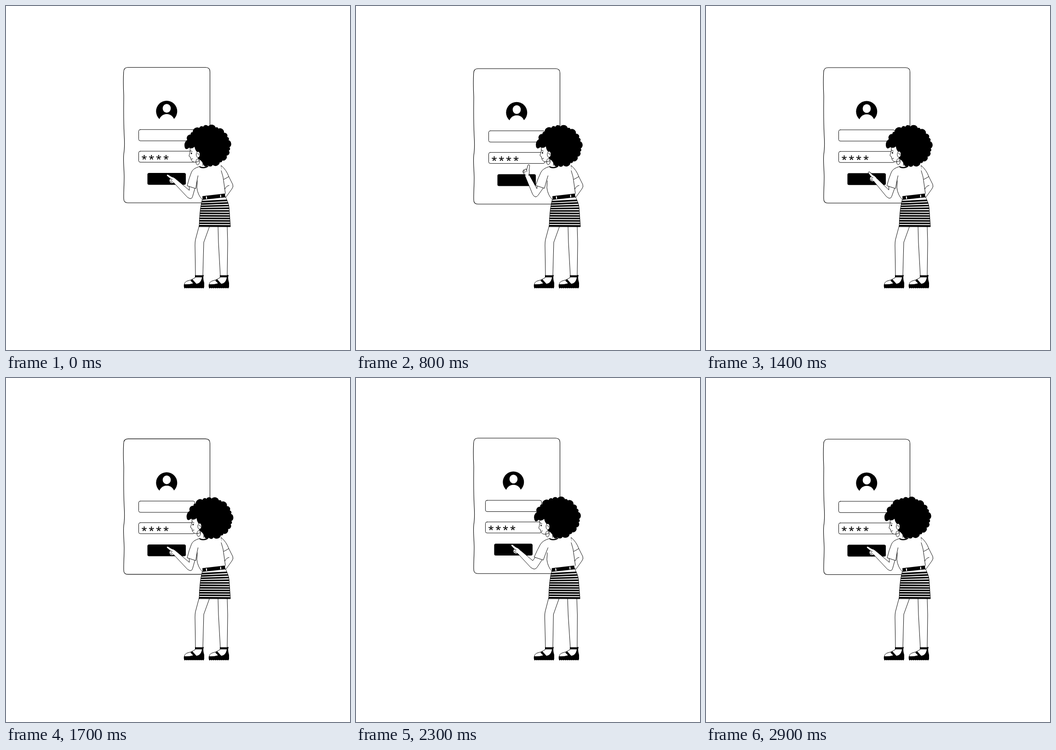
An HTML page that plays this animation: 748x748 px, repeating every 3 s.

```html
<!DOCTYPE html>
<html lang="en">
<head>
<meta charset="utf-8">
<title>Login</title>
<style>
  html, body { margin: 0; width: 100%; height: 100%; overflow: hidden; background: #fff; }
  svg { display: block; width: 100%; height: 100%; }
  .ln { fill: #fff; stroke: #000; stroke-width: .95; stroke-linejoin: round; stroke-linecap: round; }
  .open { fill: none; }
  .w { fill: #fff; }
  text { font: 22px "Open Sans", "Noto Sans", sans-serif; text-anchor: middle; stroke: #000; stroke-width: .2; }
</style>
</head>
<body>
<svg viewBox="0 0 748 748">
  <defs>
    <path id="skirtShape" d="M427 420L477 415Q484 428 485 438L488 480H420Q421 440 427 420Z"/>
    <clipPath id="skirtClip"><use href="#skirtShape"/></clipPath>
    <g id="shoe">
      <path class="ln" d="M412 586L411 591Q403 596 394 598Q388 600 388 606H430L427 586Z"/>
      <path d="M411 585H430L429 590Q429 596 431 602V611L430 613H388Q386 610 387 605Q397 606 407 603L401 597L405 594L414 604Q424 603 426 590H411Z"/>
      <path d="M389 612.4H430" stroke="#000" stroke-width="3" stroke-linecap="round" stroke-dasharray="0 4.4"/>
    </g>
  </defs>

  <g id="panel">
    <path class="ln" style="stroke-width:1.1" d="M265 133.5H434Q443.500 133.500 443.500 143V428H265Q256 428 256 419C255.500 405 257 390 257 370C256.500 350 254.500 335 256 322C258.500 308 258 296 257 280C255 240 256 215 256 195C255 175 255 160 255.700 144Q256 133.500 265 133.500Z"/>
    <g id="form">
      <circle cx="349.300" cy="229" r="23"/>
      <ellipse class="w" cx="349.500" cy="222.500" rx="8.800" ry="9.500"/>
      <circle class="w" cx="349.500" cy="252" r="17"/>
      <rect class="ln" x="288.500" y="268.700" width="122" height="24.500" rx="3.500"/>
      <rect class="ln" x="288.500" y="315.700" width="122" height="24" rx="3.500"/>
      <text x="300.500 316.300 332 348" y="340">****</text>
      <rect x="307.500" y="363" width="83.500" height="25.700" rx="3.500"/>
    </g>
  </g>

  <use href="#shoe"/>
  <use href="#shoe" x="54"/>
  <g id="lower">
    <path class="ln" d="M420 478L412 508Q411 512 411 520L412 586H428L430 514L443 478ZM461 478L462 515L466 586H481L482 515L481 478Z"/>
    <use href="#skirtShape" class="ln"/>
    <g id="stripes" clip-path="url(#skirtClip)" stroke="#000" stroke-width="3.400"/>
  </g>

  <path class="ln" d="M468 347Q479 356 484.500 371L493 388Q495 393 491 398L478 416L470 408Z"/>
  <path class="ln open" d="M484.500 371L472 378M485 390Q478 392 476 398"/>
  <path class="w" d="M421 348L415 395Q418 412 425 420L477 413L474 380L467 347Z"/>
  <path class="ln open" d="M416 380L415 395Q417 411 426 420M468 358Q473 372 474 386L477 408"/>
  <g id="belt">
    <path d="M427 413.500L476 407.800L477 416L427.500 421.500Z"/>
    <path d="M435.700 414L436.200 419.500M466.500 410.500L467 416" stroke="#fff" stroke-width="2.200"/>
  </g>

  <path id="arm" class="ln"/>
  <g id="hand">
    <path class="ln" d="M-4.500 1C-9 -1 -11 -4 -9 -8L-5 -11L-3 -10L-3 -20Q-1.500 -23.500 .8 -20.500L2.500 -10Q5 -7 4.500 1"/>
    <path class="ln open" d="M-9 -7L-4 -5.500M-9.500 -4L-4.500 -2.500M-3 -10L-1.500 -6"/>
  </g>
  <path id="sleeve" class="ln"/>
  <path d="M420.500 348Q430 353 440 347L440 349Q431 355.500 421 351Z"/>

  <g id="head">
    <path class="w" d="M413 335H430V348H421Z"/>
    <path class="ln" d="M400 306L400.500 316Q399 322 398 326Q399 328.500 401 328.500L402.500 334Q405 340 412 339.500Q421 339 424 330V306Z"/>
    <path class="ln open" d="M428 336V347M400.500 314.500L405 316.500M403.500 333L406 332"/>
    <ellipse cx="403.200" cy="320.300" rx="1.300" ry="1.900"/>
    <path id="hair"/>
    <ellipse class="ln" cx="417.700" cy="323" rx="4" ry="6.500"/>
    <path class="ln open" d="M416 321Q419 319 419 324"/>
    <ellipse class="ln open" cx="416.700" cy="339" rx="3.800" ry="6.500"/>
  </g>
</svg>
<script>
const $ = id => document.getElementById(id);
const set = (id, name, value) => $(id).setAttribute(name, value);
const mix = (a, b, p) => a + (b - a) * p;
const ease = p => p * p * (3 - 2 * p);
const ramp = (t, from, to) => ease(Math.min(1, Math.max(0, (t - from) / (to - from))));
// Rises from a to b, falls back to rest at c.
const swell = (t, a, b, c) => ramp(t, a, b) - ramp(t, b, c);

const LOOP = 3000, STEP = 100;
const PRESS = { ex: 403, ey: 421, wx: 367, wy: 380, turn: -50, hem: 0 };
const RAISE = { ex: 388, ey: 417, wx: 372, wy: 364, turn: 28, hem: -4 };
const REACH = { ex: 387, ey: 417, wx: 348, wy: 380, turn: -60, hem: -8 };

function buildHair() {
  const count = 18, start = 198, sweep = 267;
  let d = "M398 308Q391 315 388.500 307Q386 297 394 291", px = 394, py = 291;
  for (let i = 1; i <= count; i++) {
    const a = (start + sweep * (i + .25 * Math.sin(i * 2.4)) / count) * Math.PI / 180;
    const x = 439.5 + 46.5 * Math.cos(a), y = 304 + 42.5 * Math.sin(a);
    const r = Math.hypot(x - px, y - py) * .57;
    d += `A${r} ${r} 0 0 1 ${x} ${y}`;
    [px, py] = [x, y];
  }
  set("hair", "d", d + "Q427 338 421 334Q417 333 417 329L415 317Q411 313 410 306Q404 312 398 308Z");
}

function buildStripes() {
  let out = "";
  for (let i = 0; i < 11; i++) {
    const y = 424 + i * 5.4, tilt = Math.max(-.5, 4 - i);
    out += `<path d="M415 ${y + tilt / 2}L492 ${y - tilt / 2}"/>`;
  }
  $("stripes").innerHTML = out;
}

function drawArm(lift, reach) {
  const pose = {};
  for (const k in PRESS)
    pose[k] = PRESS[k] + (RAISE[k] - PRESS[k]) * lift + (REACH[k] - PRESS[k]) * reach;
  const { ex, ey, wx, wy, turn, hem } = pose;
  const len = Math.hypot(wx - ex, wy - ey), ux = (wx - ex) / len, uy = (wy - ey) / len;
  // Point given along the forearm and across it, from the elbow.
  const p = (along, across) => `${ex + ux * along - uy * across} ${ey + uy * along + ux * across}`;
  const lx = 394 + hem, ly = 391 + hem / 4, rx = 412.5 + hem * .8, ry = 397 + hem / 6;
  set("arm", "d", `M${lx + 4} ${ly - 2}L${p(18, 10)}L${p(len, 4.5)}L${p(len, -4.5)}L${p(10, -3)}` +
    `Q${p(-2, -1)} ${mix(ex, rx, .3)} ${mix(ey, ry, .3)}L${rx - 1} ${ry - 3}`);
  set("hand", "transform", `translate(${wx} ${wy}) rotate(${turn})`);
  set("sleeve", "d", `M421 349Q406 353 ${403 + hem / 3} 362Q${398 + hem * .6} 374 ${lx} ${ly}` +
    `L${rx} ${ry}Q${415 + hem / 3} 380 417.500 369`);
}

function draw(now) {
  const t = Math.floor(now / STEP) * STEP % LOOP;
  const reach = swell(t, 1900, 2500, 2900);
  const lift = swell(t, 0, 500, 1700) + .4 * swell(t, 1700, 2050, 2500);
  const nod = 2.4 * ramp(t, 0, 600) + 3.7 * ramp(t, 1600, 1850) - 9.1 * ramp(t, 1900, 2500) + 3 * ramp(t, 2500, 2900);
  const lean = `translate(0 590) skewX(${.7 * swell(t, 1700, 1950, 2900)}) translate(0 -590)`;
  set("panel", "transform", `translate(0 ${2.7 * Math.sin(t / LOOP * 2 * Math.PI)})`);
  set("form", "transform", `translate(${-9.5 * reach} 0)`);
  set("head", "transform", `rotate(${nod} 430 375)`);
  set("lower", "transform", lean);
  set("belt", "transform", lean);
  drawArm(lift, reach);
}

function loop() {
  draw(performance.now());
  requestAnimationFrame(loop);
}

buildHair();
buildStripes();
loop();
</script>
</body>
</html>
```
